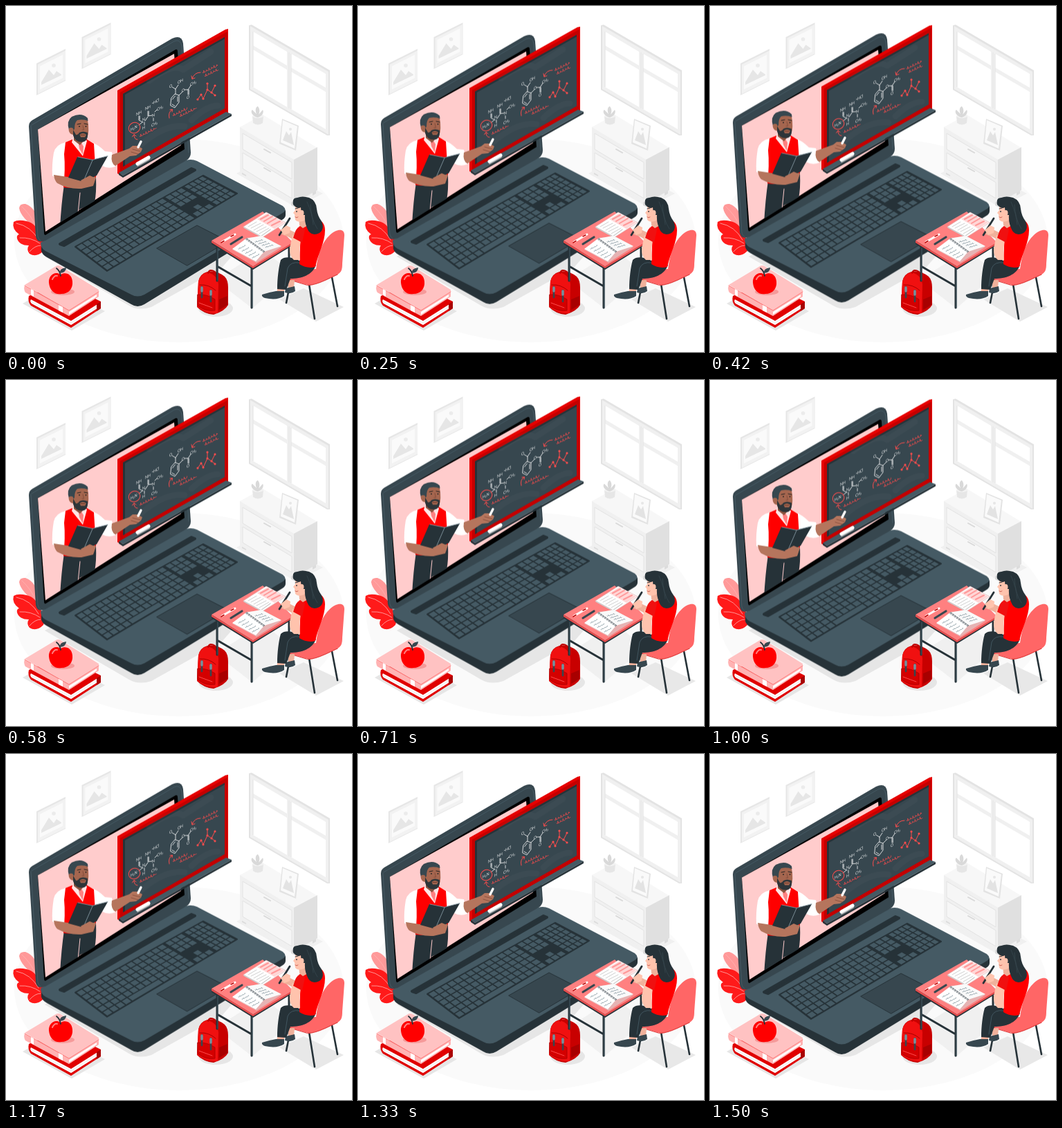
Write an HTML page that moves like this. It is 500 px wide and 500 px high and loops after 1540 ms.

```html
<!DOCTYPE html>
<html lang="en">
<head>
<meta charset="utf-8">
<title>Online lesson</title>
<style>
html, body { margin: 0; width: 100%; height: 100%; overflow: hidden; background: #fff; }
svg { display: block; width: 100vw; height: 100vh; }
.r { stroke-linejoin: round; stroke-linecap: round; }
.n { fill: none; }
#chalk text { font: 6.5px "Open Sans", sans-serif; fill: #fff; }
</style>
</head>
<body>
<svg viewBox="0 0 500 500">
  <ellipse cx="250" cy="339" rx="238" ry="147" fill="#fafafa"/>

  <!-- wall -->
  <g id="pic">
    <path d="M44 83L86 62V108L44 129Z" fill="#e6e6e6"/>
    <path d="M46 84.500L86 64.500V107L46 127Z" fill="#f2f2f2"/>
    <path d="M49 87L82 70.500V104L49 120.500Z" fill="#fafafa"/>
    <path d="M51 114V110L62 92L69 100L73 94L80 99V100Z" fill="#e6e6e6"/>
    <circle cx="69" cy="86" r="2.800" fill="#ebebeb"/>
  </g>
  <use href="#pic" x="65.500" y="-38"/>
  <path d="M351 28L355 27L468 93V187L464 187L351 121Z" fill="#e3e3e3"/>
  <path d="M353 29L466 95V186L353 120Z" fill="#f0f0f0"/>
  <path d="M357 37L406 66V86L357 57ZM357 63L406 92V146L357 117ZM412 69L462 98V118L412 89ZM412 95L462 124V178L412 149Z" fill="#fff"/>
  <path d="M357 37V117M412 69V149M409 67V148" stroke="#e3e3e3" class="n"/>

  <!-- dresser -->
  <path d="M333 242L366 224L458 271L419 291Z" fill="#f0f0f0"/>
  <path d="M341 236V243L347 246V238ZM412 280V288L418 291V282ZM443 268V274L448 271V264Z" fill="#dcdcdc"/>
  <path d="M338 175L371 157L450 205L416 225Z" fill="#f7f7f7"/>
  <path d="M338 175L416 222V285L338 239Z" fill="#f0f0f0"/>
  <path d="M416 222L450 204V266L416 285Z" fill="#e0e0e0"/>
  <path d="M342 184L413 226V250L342 207ZM342 212L413 255V278L342 235Z" fill="#f6f6f6" stroke="#e3e3e3"/>
  <path d="M373 207L382 212M373 234L382 239" stroke="#d9d9d9" stroke-width="2" class="r"/>
  <path d="M356 159Q364 165 372 159L371 169Q364 174 357 169Z" fill="#e6e6e6"/>
  <ellipse cx="364" cy="159" rx="8" ry="3" fill="#f2f2f2"/>
  <path d="M363 161C353 157 354 151 356 150L362 156C359 149 362 145 364 145C367 149 367 153 365 157L371 150C373 153 371 159 364 161Z" fill="#d9d9d9"/>
  <path d="M399 163L423 173L419 209L395 199Z" fill="#e3e3e3"/>
  <path d="M400 165L421 174L417 206L397 197Z" fill="#fafafa"/>
  <path d="M400 194L405 181L409 187L412 182L416 201Z" fill="#e3e3e3"/>
  <circle cx="411" cy="178" r="2" fill="#e6e6e6"/>

  <!-- leaves and ground shadows -->
  <g class="r">
    <path d="M47 324Q21 306 19 292Q20 285 28 286Q45 292 48 318Z" fill="#ff9999"/>
    <path d="M54 354Q44 364 34 358Q29 352 33 346Q19 346 16 336Q15 331 19 330Q8 322 11 312Q17 308 30 311Q43 314 49 330L57 344Z" fill="#ff1a1a"/>
    <path d="M15 314Q36 318 47 338M20 335Q36 334 49 343M34 355Q42 346 50 346M23 290Q36 302 43 318" class="n" stroke="#ffb3b3" stroke-width=".8"/>
  </g>
  <path d="M56 362L178 433Q192 441 210 435L312 378L340 346L190 290Z" fill="#e6e6e6"/>
  <path d="M303 396L371 352L414 386L356 437Z" fill="#f0f0f0"/>

  <g id="float" class="r">
    <!-- laptop base -->
    <path d="M51 346L190 418L404 295V302Q404 306 399 309L200 431Q190 437 181 431L59 363Q52 359 51 354Z" fill="#263238"/>
    <path d="M50 342L254 226Q265 219 276 224L400 289Q407 295 400 299L200 417Q190 422 181 417L57 354Q50 350 50 342Z" fill="#455a64"/>
    <path d="M78 344L268 235L273 237L84 346Z" fill="#263238" stroke="#263238" stroke-width="4"/>
    <path d="M218 350L276 317L321 340L262 375Z" fill="#37474f" stroke="#263238" stroke-width="1"/>
    <g id="keys"></g>

    <!-- screen -->
    <path d="M38 165L240 47Q254 41 256 54L267 212Q267 219 261 223L57 339Q45 344 43 333L33 174Q33 168 38 165Z" fill="#37474f"/>
    <path d="M36 173L46 333Q47 338 50 339M37 172L243 51Q252 47 254 58L264 212" class="n" stroke="#455a64" stroke-width="1"/>
    <path d="M46 178.500L245 63Q248 62 248 66L258 207L57 331Q55 331 55 328Z" fill="#000"/>
    <path d="M46 178.500L243 69L253 201L57 326Z" fill="#ffcccc"/>

    <!-- blackboard -->
    <path d="M161 122L317 34L321 33V154L165 244L161 242Z" fill="#e60000"/>
    <path d="M165 125L320 37V155L165 244Z" fill="#c40000"/>
    <path d="M169 127L316 45V148L169 232Z" fill="#37474f"/>
    <path d="M169 127L316 45V47.500L172 128V230.500L169 232Z" fill="#263238"/>
    <path d="M207 108Q242 82 256 92Q278 78 296 66M194 201Q230 170 258 174M268 165Q290 144 306 144" class="n" stroke="#fff" stroke-width="9" opacity=".025"/>
    <path d="M163 241L318 153L326 156L169 245Z" fill="#455a64"/>
    <path d="M163 241L169 245L326 156V159L169 248L163 244Z" fill="#263238"/>
    <path d="M190 228L206 219" stroke="#fff" stroke-width="5"/>
    <path d="M190 231L207 221.500" stroke="#d0d0d0" stroke-width="1.500"/>
    <g id="chalk">
      <g class="n" stroke="#fff" stroke-width=".8">
        <path d="M192 172L197 168M192 159V165L198 168M193.200 159V164M201 166L205 160M205 152V159L211 158M206.200 152V158M215 153L218 150M200 168V172M213 162V166"/>
        <path d="M239 133L244 127L250 129V139L244 147L238 144ZM240.500 135L244.500 130M248 131V138M240 142L244 144.500M245 127V120L240 117M245 120L249 114M250 129L255 124M258 121L263 121L267 115M263 121V128M264.200 121V128"/>
      </g>
      <g class="n" stroke="#ff4d4d" stroke-width="1">
        <ellipse cx="185.500" cy="176" rx="8.500" ry="7.500" transform="rotate(-30 185.500 176)"/>
        <path d="M190 193Q185 193 185 186M182.500 189L185 185.500L188 188M236 162Q234 153 240 150M237 150L240.500 149.500L240 153M269 105Q272 96 281 96M268 101L269 105.500L273 104"/>
        <path d="M277 135L282 128L285 134L291 121V112M291 121L297 125L302 115M297 125L302 129"/>
      </g>
    </g>

    <!-- teacher -->
    <clipPath id="clip"><path d="M47 140H205V234L57 326Z"/></clipPath>
    <g clip-path="url(#clip)">
      <path d="M84 258L130 247Q131 270 128 284L106 294L102 306L78 320Q80 285 84 258Z" fill="#263238"/>
      <path d="M107 270L104 300" class="n" stroke="#ffcccc" stroke-width="1"/>
      <path d="M86 197Q72 200 69 212Q66 230 67 245Q76 254 88 246L94 215Z" fill="#fff"/>
      <path d="M122 196Q133 200 143 210L153 211L158 232Q148 236 139 231L124 221Z" fill="#fff"/>
      <path d="M86 197L98 192L114 191L127 199Q128 215 130 247Q108 266 83 262Q86 235 84 214Z" fill="#ff0000"/>
      <path d="M97 190L113 190L117 195L111 217L95 197Z" fill="#ffe6e6"/>
      <path d="M105 200L109 198L112 203L111 215L106 206Z" fill="#ff8080"/>
      <path d="M98 184L113 184V194L107 201L98 194Z" fill="#8b533f"/>
      <path d="M93 168L98 162L118 165Q121 183 117 190Q110 198 102 193L97 186Q91 185 91 179Z" fill="#a5664f"/>
      <path d="M97 179L101 186Q104 187 106 183Q111 180 118 183Q119 196 110 196.500Q100 197 97 187Z" fill="#2d3539"/>
      <path d="M106.500 186Q111 182 116 186L114 189.500H108Z" fill="#a5664f"/>
      <path d="M108 186.500H114" stroke="#6a3a2c" stroke-width="1"/>
      <path d="M91 179Q87 166 95 160Q109 153 118 162L118.500 166Q111 163 103 165Q99 168 99 178L96 180Q94 174 92 177Z" fill="#37474f"/>
      <circle cx="94" cy="179" r="3.300" fill="#a5664f"/>
      <path d="M103 171L108 170M113 170L118 171" stroke="#222" stroke-width="1"/>
      <circle cx="106" cy="174" r=".9" fill="#222"/><circle cx="115.500" cy="174" r=".9" fill="#222"/>
      <path d="M111 173L112.500 179H110" class="n" stroke="#7d4836" stroke-width=".8"/>
      <path d="M69 244L89 247L108 250L124 244L130 248L126 260L109 264Q90 265 74 256Q70 252 69 244Z" fill="#b5755d"/>
      <path d="M90 248L103 218L125 222L147 217L131 245L112 254Z" fill="#263238"/>
      <path d="M104 218L125 222.500L147 216.500M125 223L112 253" class="n" stroke="#90a4ae" stroke-width=".8"/>
      <path d="M108 252L121 245L128 248L127 257L114 262Z" fill="#b5755d"/>
    </g>
    <path d="M153 215L178 206L183 202L190 202L197 206L195 211L188 216L179 217L158 231Q151 227 153 215Z" fill="#b5755d"/>
    <path d="M183 207L194 210M181 211L191 214" stroke="#804b39" stroke-width=".8"/>
    <path d="M191 204L195 196" stroke="#fff" stroke-width="3.400"/>
  </g>

  <!-- books and apple -->
  <g class="r">
    <path d="M24 430L70 404L143 441L95 469Z" fill="#e6e6e6"/>
    <path d="M33 419L80 399L137 427V437L94 465L36 433Q31 427 33 419Z" fill="#e00000"/>
    <path d="M36 424L94 455L132 431V437L94 461L37 430Q34 427 36 424Z" fill="#fff"/>
    <path d="M36 427L94 458L132 434" class="n" stroke="#e0e0e0" stroke-width=".7"/>
    <path d="M131 431L137 427V437L131 441Z" fill="#a80000"/>
    <path d="M27 404L91 440L134 413V420L91 448L28 414Q25 409 27 404Z" fill="#ffb3b3"/>
    <path d="M91 442L131 417V420L91 446Z" fill="#fff"/>
    <path d="M27 403L72 376Q75 374 79 376L134 410V414L91 440Z" fill="#ffc2c2"/>
    <path d="M27 404L91 440L134 413" class="n" stroke="#ff8080" stroke-width="1"/>
    <path d="M76 432L82 435V443L76 440ZM36 409L40 411V420L36 417Z" fill="#fff"/>
    <ellipse cx="82" cy="413" rx="17" ry="5" fill="#f59a9a"/>
    <path d="M79 388C70 382 61 390 62 400C63 411 71 418 80 416C91 416 97 408 96 398C95 387 86 384 79 388Z" fill="#ff0000"/>
    <path d="M67 395Q70 389 74 390" class="n" stroke="#ff8080" stroke-width="2"/>
    <path d="M79 390Q78 383 73 379" class="n" stroke="#263238" stroke-width="1.800"/>
    <path d="M78 386Q77 379 87 378Q87 385 78 386Z" fill="#37474f"/>

    <!-- bag -->
    <ellipse cx="303" cy="437" rx="25" ry="12" fill="#e6e6e6"/>
    <path d="M278 398Q280 387 291 384Q303 381 316 391Q321 396 321 407V432Q316 441 300 446Q286 445 276 435Z" fill="#c80000"/>
    <path d="M278 398Q281 387 291 385Q305 388 307 402L306 444Q288 445 276 434Z" fill="#f01010"/>
    <path d="M277 417Q290 416 302 424V440Q288 442 277 433Z" fill="#d40000" stroke="#a80000" stroke-width=".8"/>
    <path d="M308 424L320 419V432L308 439Z" fill="#a80000"/>
    <path d="M292 386Q294 379 302 384" class="n" stroke="#c00000" stroke-width="2"/>
    <path d="M283 406V421M296 411V427" stroke="#37474f" stroke-width="2.600"/>
    <path d="M283 407V412M296 412V417" stroke="#78909c" stroke-width="3.500"/>
    <path d="M280 403Q293 402 303 411" class="n" stroke="#a80000" stroke-width="1"/>
    <path d="M279 429L298 436" stroke="#ff4d4d" stroke-width="1"/>
  </g>

  <!-- desk -->
  <path d="M395 424L430 408L488 435L448 456Z" fill="#e8e8e8"/>
  <g class="r">
    <path d="M305 347V397M355 378V436M409 350V405M305 376L355 405" class="n" stroke="#263238" stroke-width="3"/>
    <path d="M306 347V397M356 378V436" stroke="#455a64" stroke-width="1"/>
    <path d="M297 339L357 376L414 342V346L357 381L297 344Z" fill="#263238"/>
    <path d="M297 339L371 297L415 342L357 376Z" fill="#ff8080"/>
    <path d="M297 339L357 376L414 342V344.500L357 379L297 342Z" fill="#e64d4d"/>
    <path d="M343 319L376 298L404 313L371 334Z" fill="#fff" stroke="#e0b0b0" stroke-width=".7"/>
    <path d="M363 308L377 300L402 313L388 322Z" fill="#ffd6d6"/>
    <path d="M368 308L379 302M373 311L385 304M378 314L390 307M384 317L396 311" stroke="#ff9999" stroke-width="2"/>
    <path d="M344 320L368 333L382 323" class="n" stroke="#cfcfcf" stroke-width="1.500"/>
    <path d="M350 319L362 312M354 321L368 314M358 324L372 316M362 326L376 319M366 329L380 321" stroke="#bbb" stroke-width=".7"/>
    <path d="M327 352L348 335L372 333L398 348L362 371Z" fill="#e6b3b3"/>
    <path d="M327 351L347 336L373 355L361 369Z" fill="#fff"/>
    <path d="M347 336L369 332L398 347L373 355Z" fill="#fafafa"/>
    <g id="notes" class="n" stroke="#546e7a" stroke-width=".6"></g>
    <path d="M312 341L331 330" stroke="#fff" stroke-width="3"/>
    <path d="M311 342L315 339.500M325 333L329 331" stroke="#c00000" stroke-width="1.500"/>
    <path d="M325 344L341 334" stroke="#37474f" stroke-width="3.200"/>
  </g>

  <!-- student -->
  <g class="r">
    <path d="M412 393L405 429M438 402L446 452M471 392L479 434" stroke="#263238" stroke-width="2.600"/>
    <path d="M489 331C489 321 478 322 468 331C457 341 451 357 448 380L413 382C405 385 405 393 412 396L432 402C440 405 451 401 462 396L479 388C485 385 486 380 486 372Z" fill="#ff6666"/>
    <path d="M406 389Q407 394 414 397L434 403Q442 405 462 396L479 388" class="n" stroke="#e03c3c" stroke-width="1.200"/>
    <path d="M408 396H417L416 408H408Z" fill="#f0b19b"/>
    <path d="M404 408L417 405L418 412Q412 417 403 414Z" fill="#37474f"/>
    <path d="M393 403H404L401 416H391Z" fill="#f0b19b"/>
    <path d="M370 417Q379 414 390 412L402 412V419Q392 426 374 422Q369 420 370 417Z" fill="#37474f"/>
    <path d="M448 374C443 389 427 394 411 394L405 410L392 409C392 394 394 377 397 367C404 360 418 364 427 370Z" fill="#263238"/>
    <path d="M424 371Q411 369 407 379L403 405" class="n" stroke="#455a64" stroke-width=".9"/>
    <path d="M423 330L407 322L399 322L398 330L407 333L421 341Z" fill="#f0b19b"/>
    <path d="M395 331L410 307" stroke="#263238" stroke-width="2.800"/>
    <path d="M397 324L405 317L411 320L410 328L402 331Z" fill="#ffc3ad"/>
    <path d="M427 317L441 309C454 306 461 313 461 324C461 342 451 357 447 377Q435 380 424 373C425 357 425 334 427 317Z" fill="#ff0000"/>
    <path d="M414 331L426 336L424 354L425 367L416 367Q409 361 410 350Z" fill="#ffc3ad"/>
    <path d="M418 326Q421 319 428 317L432 323L428 342L415 335Z" fill="#f01010"/>
    <path d="M423 304H434L438 316L429 321L424 317Z" fill="#f0b19b"/>
    <path d="M418 286L431 282L436 299L431 310Q422 314 418 309L417 301L415 299L418 295Z" fill="#ffc3ad"/>
    <path d="M415 287Q413 277 421 277Q428 274 438 277Q448 281 449 293Q450 303 456 311Q461 322 453 328Q443 333 437 325Q431 314 432 302L427 302L426 291Q421 294 415 287Z" fill="#263238"/>
    <path d="M440 287Q441 309 450 322M435 283Q443 301 444 316" class="n" stroke="#37474f" stroke-width=".8"/>
    <ellipse cx="427.500" cy="299" rx="3" ry="4" fill="#ffc3ad"/>
    <path d="M418 293L422 292" stroke="#263238" stroke-width="1"/>
    <circle cx="420" cy="297" r=".9" fill="#263238"/>
    <path d="M418 305Q420 307 422 305" class="n" stroke="#d0655a" stroke-width="1"/>
  </g>
</svg>
<script>
const $ = id => document.getElementById(id);

function add(parent, tag, attrs, text = '') {
  const el = document.createElementNS('http://www.w3.org/2000/svg', tag);
  for (const k in attrs) el.setAttribute(k, attrs[k]);
  el.textContent = text;
  parent.append(el);
  return el;
}

// Keyboard plane: u runs along a row, v towards the user.
const mix = (a, b, k) => a + (b - a) * k;
const at = (u, v) => [
  mix(mix(100, 285, u), mix(146, 334, u), v),
  mix(mix(348, 245, u), mix(383, 271, u), v)
].map(n => n.toFixed(1)).join(' ');
const quad = (u, v, w, h) =>
  `M${at(u, v)}L${at(u + w, v)}L${at(u + w, v + h)}L${at(u, v + h)}Z`;

add($('keys'), 'path', { d: quad(0, 0, 1, 1), fill: '#263238', stroke: '#263238', 'stroke-width': 2 });
let keys = '';
const row = (u, v, count, width) => {
  for (let i = 0; i < count; i++) keys += quad(u + i * width, v, width - .009, .135);
};
for (let r = 0; r < 6; r++) {
  const v = .015 + r * .165;
  if (r < 5) row(.008, v, 14, .0485);
  else {
    row(.008, v, 4, .0485);
    row(.202, v, 1, .242);
    row(.444, v, 5, .0485);
  }
  if (r < 3) row(.7, v, 3, .045);
  if (r === 4) row(.745, v, 1, .045);
  if (r === 5) row(.7, v, 3, .045);
  row(.85, v, 4, .037);
}
add($('keys'), 'path', { d: keys, fill: '#455a64' });

// Chalk lettering follows the slope of the board.
const letters = [
  [188, 159, 'NH'], [201, 151, 'NH'], [211, 143, '•HCl'], [218, 152, 'CH₃'],
  [180, 181, 'H₂N'], [197, 167, 'N'], [211, 161, 'N'], [197, 179, 'H'], [210, 175, 'CH₃'],
  [236, 119, 'O'], [248, 113, 'OH'], [254, 125, 'O'], [261, 135, 'O'], [266, 116, 'CH₃']
];
for (const [x, y, s] of letters)
  add($('chalk'), 'text', { transform: `matrix(.8 -.43 0 .92 ${x} ${y})` }, s);

// Looping handwriting along a sloped line
function scribble(x, y, len, slope, amp) {
  let d = `M${x} ${y}`;
  for (let i = 1; i <= len * 3; i++) {
    const s = i / 3, a = s * 1.7;
    const dx = s + Math.sin(a) * amp * .6;
    const dy = s * slope + Math.sin(a + 1.7) * amp * (.7 + .4 * Math.sin(s * .8));
    d += `L${(x + dx).toFixed(1)} ${(y + dy).toFixed(1)}`;
  }
  return d;
}
const red = [[193, 188, 23], [241, 158, 20], [251, 159, 23], [284, 96, 22], [287, 101, 19]];
for (const [x, y, len] of red)
  add($('chalk'), 'path', { d: scribble(x, y, len, -.5, 1.8), class: 'n', stroke: '#ff4d4d', 'stroke-width': .8 });
for (const [x, y] of [[277, 135], [282, 128], [285, 134], [291, 121], [291, 112], [297, 125], [302, 115], [302, 129]])
  add($('chalk'), 'circle', { cx: x, cy: y, r: 1.6, fill: '#ff4d4d' });

// Handwriting and binding on the notebook
for (let i = 0; i < 5; i++) {
  add($('notes'), 'path', { d: scribble(336 + i * 5, 351 + i * 3.2, 10, -.5, .8) });
  if (i < 4) add($('notes'), 'path', { d: scribble(360 + i * 5, 341 + i * 2.5, 11, -.3, .8) });
}
for (let i = 0; i < 9; i++)
  add($('notes'), 'circle', { cx: 348 + i * 3, cy: 337 + i * 2.2, r: 1.2, stroke: '#37474f' });

// Linear 10px bob of 1500 ms, entered 42 ms after its lowest point, then a 40 ms hold.
const LOOP = 1540, BOB = 1500, LEAD = 42, RISE = 10;
const rate = RISE / (BOB / 2);
const key = (t, y) => ({ transform: `translateY(${y}px)`, offset: t / LOOP });
$('float').animate([
  key(0, 0),
  key(BOB / 2 - LEAD, LEAD * rate - RISE),
  key(BOB - LEAD, LEAD * rate),
  key(BOB, 0),
  key(LOOP, 0)
], { duration: LOOP, iterations: Infinity });
</script>
</body>
</html>
```
